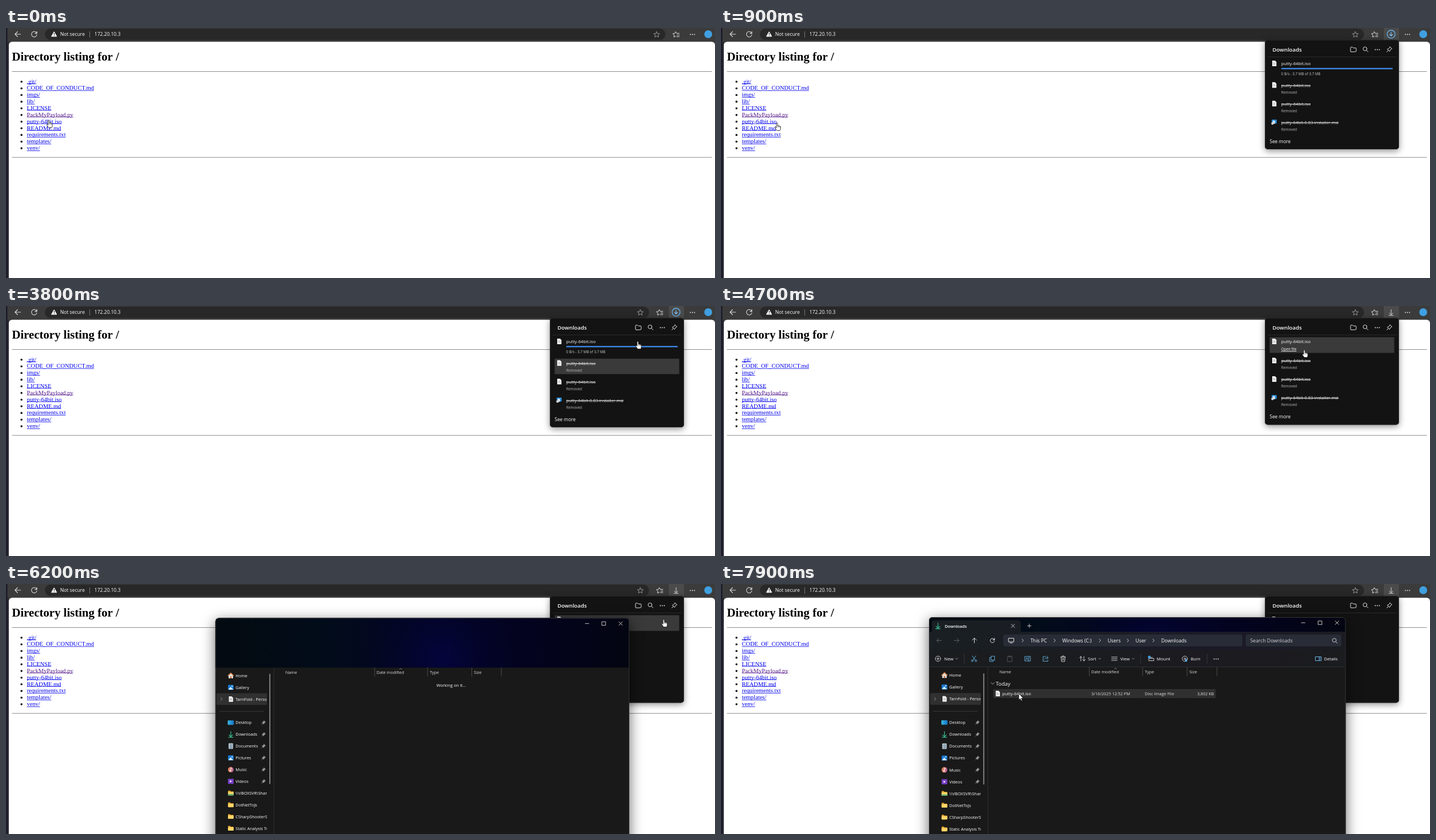
Recreate the animation shown at these times as an HTML page with a canvas. Size 1258 by 445 pixels, loop 8000 ms.

```html
<!DOCTYPE html>
<html lang="en">
<head>
<meta charset="utf-8">
<title>Directory listing</title>
<style>
html, body { margin: 0; width: 100%; height: 100%; overflow: hidden; background: #fff; }
canvas { display: block; }
</style>
</head>
<body>
<canvas id="stage" width="1258" height="445"></canvas>
<script>
const ctx = document.getElementById('stage').getContext('2d');
const LOOP = 8000, STEP = 100;
const DOWNLOAD_SHOWN = 700, DOWNLOAD_DONE = 4000, WINDOW_OPEN = 6000;
const UI = '"Open Sans", "Noto Sans", sans-serif';
const SERIF = '"Liberation Serif", serif';

// time, x, y of the pointer's hot spot
const POINTER = [
  [0, 76, 164], [700, 76, 164], [900, 99.5, 169], [1000, 330, 215], [1100, 700, 248],
  [1200, 1010, 253], [1300, 1106, 249], [1600, 1114, 244], [1700, 1114, 244],
  [2100, 1136, 239], [3300, 1136, 239], [3800, 1121, 63], [4400, 1121, 63],
  [4700, 1035, 78], [5200, 1184, 60], [5300, 1184, 59], [5500, 1160, 59],
  [5600, 1160, 59], [6000, 1167, 63], [6300, 1167, 63], [6700, 1072, 33],
  [6800, 1010, 60], [7000, 560, 154], [7100, 540, 192], [7200, 531, 203], [7300, 528, 195]
];

function pointerAt(t) {
  const next = POINTER.findIndex(k => k[0] > t);
  if (next < 0) return POINTER[POINTER.length - 1].slice(1);
  const a = POINTER[next - 1] || POINTER[0], b = POINTER[next];
  const p = (t - a[0]) / (b[0] - a[0] || 1);
  return [a[1] + (b[1] - a[1]) * p, a[2] + (b[2] - a[2]) * p];
}

function rect(x, y, w, h, color, r = 0) {
  ctx.fillStyle = color;
  ctx.beginPath();
  ctx.roundRect(x, y, w, h, r);
  ctx.fill();
}

function outline(x, y, w, h, color, r = 0) {
  ctx.strokeStyle = color;
  ctx.lineWidth = 1;
  ctx.beginPath();
  ctx.roundRect(x + .5, y + .5, w - 1, h - 1, r);
  ctx.stroke();
}

function disc(x, y, r, color) {
  rect(x - r, y - r, 2 * r, 2 * r, color, r);
}

// Text centred vertically on its capitals; returns its width.
function text(str, x, midY, size, color = '#fff', weight = 400, family = UI) {
  ctx.font = `${weight} ${size}px ${family}`;
  ctx.fillStyle = color;
  ctx.fillText(str, x, midY + size * .36);
  return ctx.measureText(str).width;
}

function icon(d, x, y, color = '#e6e6e6', width = 1, fill) {
  const p = new Path2D(d);
  ctx.save();
  ctx.translate(x, y);
  ctx.lineJoin = ctx.lineCap = 'round';
  if (fill) { ctx.fillStyle = fill; ctx.fill(p); }
  if (width) { ctx.strokeStyle = color; ctx.lineWidth = width; ctx.stroke(p); }
  ctx.restore();
}

function shadowed(color, blur, dy, draw) {
  ctx.save();
  ctx.shadowColor = color;
  ctx.shadowBlur = blur;
  ctx.shadowOffsetY = dy;
  draw();
  ctx.restore();
}

function gradient(x0, x1, ...colors) {
  const g = ctx.createLinearGradient(x0, 0, x1, 0);
  colors.forEach((c, i) => g.addColorStop(i / (colors.length - 1), c));
  return g;
}

const DOWN = 'M0-5V4M-3.2 1L0 4.2 3.2 1M-4 5.2H4';
const STAR = 'M0-5L1.5-1.6 5.2-1.3 2.4 1.1 3.3 4.7 0 2.8-3.3 4.7-2.4 1.1-5.2-1.3-1.5-1.6Z';
const FOLDER = 'M-5-3.5Q-5-4.5-4-4.5H-1.5L0-3H4Q5-3 5-2V3Q5 4-4 4Q-5 4-5 3Z';
const SEARCH = 'M2.6-.9A3.4 3.4 0 1 1-4.2-.9A3.4 3.4 0 1 1 2.6-.9M1.7 1.6L4.6 4.5';
const PIN = 'M1-4.5L4.5-1 2.8-.3 1 2 .3 3.7-3.7-.3-2-1 .3-2.8ZM-2 2L-4.7 4.7';
const CROSS = 'M-3-3L3 3M3-3L-3 3';
const PAGE = 'M-3.5-5H1.5L4-2.5V5H-3.5Z';

function dots(x, y) {
  for (const d of [-3.6, 0, 3.6]) disc(x + d, y, .9, '#eee');
}

function browser(t) {
  const shown = t >= DOWNLOAD_SHOWN, end = shown ? 1141 : 1170;
  rect(0, 0, 1258, 445, '#3b3b3b');
  rect(0, 25, 5, 420, '#2b2933');
  rect(0, 0, 2.5, 445, '#1d1b29');
  rect(5, 24.5, 1253, 440, '#fff', [6, 6, 0, 0]);
  rect(69, 1, end - 69, 20.5, '#282828', 10);
  icon('M5 0H-5M-.5-4.5L-5 0-.5 4.5', 21, 11, '#ddd', 1.1);
  icon('M4.6-1.5A4.8 4.8 0 1 0 4.8 1M4.8-4.8V-1.4H1.4', 50, 11, '#ddd', 1.1);
  icon('M0-4L4.5 4H-4.5Z', 85.5, 11, '#fff', 1, '#fff');
  rect(85, 9, 1.2, 3, '#282828');
  rect(85, 13, 1.2, 1.2, '#282828');
  text('Not secure', 96, 11.3, 8.7);
  rect(148, 6, 1, 11, '#777');
  text('172.20.10.3', 157, 11.3, 8.6);
  icon(STAR, end - 15.5, 11.5, '#a5a5a5', .9);
  const fav = shown ? 1160 : 1189;
  icon('M3-2L1-2-.8-5-2.4-1.8-6-1.3-3.4 1.2-4 4.7-1 3.2M2 1H5.5M1 3.8H5.5M3-2H5.5', fav, 11.5, '#e6e6e6', 1);
  dots(1218, 11.5);
  disc(1246, 11, 7, '#3f9fe0');
  if (shown) {
    rect(1176, 0, 27, 22, '#4b4b4b');
    if (t < DOWNLOAD_DONE) {
      ctx.strokeStyle = '#66b5f2';
      ctx.lineWidth = 1.3;
      ctx.beginPath();
      ctx.arc(1189, 11, 7, 0, 7);
      ctx.stroke();
      icon('M0-3.5V3M-2.6.5L0 3.2 2.6.5', 1189, 11, '#8cc8f7', 1.1);
    } else icon(DOWN, 1189, 11.5, '#ddd', 1);
  }
}

function listing(t) {
  text('Directory listing for /', 10.5, 50.3, 21.1, '#000', 700, SERIF);
  rect(10.5, 77, 1242, 1, '#8b8b8b');
  rect(10.5, 229.7, 1242, 1, '#8b8b8b');
  const names = ['.git/', 'CODE_OF_CONDUCT.md', 'imgs/', 'lib/', 'LICENSE', 'PackMyPayload.py',
    'putty-64bit.iso', 'README.md', 'requirements.txt', 'templates/', 'venv/'];
  names.forEach((name, i) => {
    const y = 95 + i * 11.85;
    const pressed = i === 6 && t >= 500 && t < 600;
    const color = pressed ? '#e00' : i === 5 ? '#551a8b' : '#0000ee';
    disc(27.5, y + .6, 1.8, '#000');
    const w = text(name, 37, y - .2, 10.55, color, 400, SERIF);
    rect(37, Math.round(y + 4), w, .8, color);
  });
}

function paper(x, y) {
  icon(PAGE, x, y, '#fff', 0, '#f2f2f2');
  rect(x - 2, y - 1, 4, .8, '#999');
  rect(x - 2, y + 1, 4, .8, '#999');
}

function downloads(t) {
  const done = t >= DOWNLOAD_DONE, shift = done ? -4.6 : 0;
  shadowed('rgba(0,0,0,.45)', 12, 3, () => rect(965, 21, 238, 195 + shift, '#131313', 5));
  outline(965, 21, 238, 195 + shift, '#292929', 5);
  text('Downloads', 978.5, 38.5, 9.7, '#fff', 600);
  icon(FOLDER, 1122, 38.5);
  icon(SEARCH, 1143.5, 38);
  dots(1164.5, 38.5);
  icon(PIN, 1186, 38);
  rect(970, 51, 228, 1, '#2b2b2b');

  const [px, py] = pointerAt(t - STEP);
  const rows = [102, 135, 168].map(y => y + shift);
  const over = (top, h) => {
    if (px > 974 && px < 1195 && py >= top && py <= top + h) rect(973.5, top, 221, h, '#3a3a3a');
  };
  over(55.5, done ? 28 : 33);
  paper(981.5, 63);
  text('putty-64bit.iso', 994, 63.7, 7.75);
  if (done) {
    const w = text('Open file', 994, 76.3, 6.4);
    rect(994, 80, w, .8, '#fff');
  } else {
    rect(994, 71, 198, 2.6, '#3a82dd', 1);
    text('0 B/s - 3.7 MB of 3.7 MB', 994, 81.4, 6.3, '#ccc');
  }
  rows.forEach((y, i) => {
    over(y - 8.3, 27.5);
    const msi = i === 2;
    if (msi) {
      rect(977, y - 5, 9, 7, '#2b8bd8', 1);
      rect(979, y - 3, 4, 5.5, '#d9e3ea');
      disc(978.5, y + 2, 2.2, '#cfd4d8');
    } else paper(981.5, y - .5);
    const w = text(msi ? 'putty-64bit-0.83-installer.msi' : 'putty-64bit.iso', 994, y, msi ? 7.6 : 7.75, '#eee');
    rect(994, y + .2, w, .8, '#eee');
    text('Removed', 994, y + 12.4, 6.4, '#bbb');
  });
  text('See more', 973.5, 201.8 + shift, 8.45);
}

function landscape(x, y) {
  rect(x - 5, y - 4.5, 10, 9, '#1878d1', 1.5);
  icon('M-4.5 4L-.5-1 4.5 4Z', x, y, '', 0, '#d7ecff');
  disc(x + 2.3, y - 2, 1, '#fff');
}

function yellowFolder(x, y) {
  icon(FOLDER, x, y, '', 0, '#dfa52d');
  rect(x - 5, y - 2, 10, 6, '#ffd566', 1);
}

const GLYPHS = {
  home(x, y) {
    icon('M-4 0V5H4V0L0-4Z', x, y, '', 0, '#e3ddd8');
    icon('M-4.8 0L0-4.5 4.8 0', x, y, '#e08545', 1.5);
    rect(x - 1, y + 1.5, 2.2, 3.5, '#bd6530');
  },
  landscape,
  paper,
  desktop(x, y) {
    rect(x - 5.5, y - 4, 11, 8, gradient(x - 5, x + 5, '#39b7e5', '#1573c4'), 1);
  },
  down(x, y) { icon(DOWN, x, y, '#38bf92', 1.2); },
  document(x, y) {
    rect(x - 4, y - 5, 8, 10, '#b4c5d2', 1);
    for (const d of [-2.5, 0, 2.5]) rect(x - 2, y + d, 4.5, 1, '#597184');
  },
  music(x, y) {
    disc(x, y, 5, gradient(x - 5, x + 5, '#e98a55', '#b8619c'));
    icon('M0 2V-3L2-2', x, y, '#fff', .9);
    disc(x - 1, y + 2, 1.2, '#fff');
  },
  video(x, y) {
    rect(x - 5, y - 4.5, 10, 9, '#7940c9', 1);
    icon('M-1.5-2L2 0-1.5 2Z', x, y, '', 0, '#fff');
  },
  share(x, y) {
    yellowFolder(x, y);
    rect(x - 5, y + 1.5, 10, 2.5, '#5eb578');
  },
  folder: yellowFolder
};

const PLACES = [
  ['home', 'Home'], ['landscape', 'Gallery'], ['paper', 'TarnFold - Personal'], null,
  ['desktop', 'Desktop', 1], ['down', 'Downloads', 1], ['document', 'Documents', 1],
  ['landscape', 'Pictures', 1], ['music', 'Music', 1], ['video', 'Videos', 1],
  ['share', '\\\\VBOXSVR\\Share'], ['folder', 'DotNetToJs'],
  ['folder', 'CSharpShooterS'], ['folder', 'Static Analysis Tools']
];

function sidebar() {
  ctx.save();
  ctx.beginPath();
  ctx.rect(369, 148, 92, 326);
  ctx.clip();
  PLACES.forEach((place, i) => {
    const y = 162.3 + i * 21.07;
    if (!place) return rect(376, 226, 79, 1, '#3a3a3a');
    if (i === 2) {
      rect(371, y - 10.5, 92, 21, '#303030', 2);
      icon('M-1.5-2.5L1.3 0-1.5 2.5', 380, y, '#999', .9);
    }
    GLYPHS[place[0]](396.5, y);
    text(place[1], 405, y, 7.45);
    if (place[2]) {
      ctx.save();
      ctx.translate(455, y);
      ctx.scale(.75, .75);
      icon(PIN, 0, 0, '#999', 1, '#999');
      ctx.restore();
    }
  });
  ctx.restore();
  rect(465.5, 159, 1.6, 198, '#989898', 1);
  rect(473, 148, 1, 326, '#2f2f2f');
}

function toolbar() {
  const chrome = gradient(369, 1108, '#191f23', '#1a1d24', '#1a1a27', '#1b1c22');
  rect(374, 64.5, 158, 22, chrome, [5, 5, 0, 0]);
  rect(369.5, 85, 738, 63, chrome);
  rect(369.5, 117, 738, 31, 'rgba(28,28,28,.55)');
  rect(369.5, 147, 738, 1, '#303135');
  icon(DOWN, 385, 74.5, '#38bf92', 1.2);
  text('Downloads', 397, 75, 7.3, '#fff', 600);
  icon(CROSS, 518, 74.5, '#ddd', .9);
  icon('M-3.2 0H3.2M0-3.2V3.2', 547, 74.5, '#ddd', .9);

  icon('M4.3 0H-4.3M-.5-3.8L-4.3 0-.5 3.8', 387, 100.5, '#5d6065');
  icon('M-4.3 0H4.3M.5-3.8L4.3 0 .5 3.8', 418, 100.5, '#5d6065');
  icon('M0 4.3V-4.3M-3.8-.5L0-4.3 3.8-.5', 449.5, 100.5);
  icon('M3.6-1.2A3.8 3.8 0 1 0 3.8 1M3.8-4V-1.1H1', 481.5, 100.5);
  rect(501, 90, 424, 21, '#282c36', 3);
  rect(931, 90, 169.5, 21, '#282c36', 3);
  icon('M-4.5-4H4.5V2.5H-4.5ZM-2 4.5H2', 515, 100.5);
  const crumbs = [['This PC', 549], ['Windows (C:)', 605.5], ['Users', 686], ['User', 735.5], ['Downloads', 781]];
  for (const [name, x] of crumbs) {
    icon('M-1.3-2.5L1.3 0-1.3 2.5', x - 13.5, 100.5, '#ddd', .9);
    text(name, x, 100.8, 8.7);
  }
  text('Search Downloads', 939, 100.8, 8.75, '#d2d3d6');
  icon(SEARCH, 1089, 101, '#ddd', .9);

  const y = 133;
  const chevron = x => icon('M-1.8-.8L0 1 1.8-.8', x, y, '#aaa', .8);
  icon('M4.7 0A4.7 4.7 0 1 1-4.7 0A4.7 4.7 0 1 1 4.7 0M-2.3 0H2.3M0-2.3V2.3', 385, y, '#ddd', .9);
  text('New', 396, y + .3, 8);
  chevron(418);
  rect(431, 124, 1, 18, '#33353a');
  icon('M-3-5L2 2.5M3-5L-2 2.5M-1.6 3.6A1.6 1.6 0 1 1-4.8 3.6A1.6 1.6 0 1 1-1.6 3.6M4.8 3.6A1.6 1.6 0 1 1 1.6 3.6A1.6 1.6 0 1 1 4.8 3.6', 449, y, '#69b7e8', .9);
  icon('M-1.5-4.5H4.5V2.5H-1.5ZM-1.5-2H-4.3V4.8H2V2.5', 481, y, '#69b7e8', .9);
  icon('M-4-4H4V5H-4ZM-1.5-5H1.5V-3H-1.5Z', 512.5, y, '#55585c', .9);
  icon('M1-4H-5V4H1M3-4H5V4H3M2-5V5M-3 2L-1.3-2.2.4 2', 544, y, '#69b7e8', .9);
  icon('M0-4H-4.5V4.5H4V2M-2 1Q-1-2 4-2M2-4.5L4.6-2 2 .5', 576, y, '#69b7e8', .9);
  icon('M-4.5-3H4.5M-3.5-3L-2.8 5H2.8L3.5-3M-1.5-3V-5H1.5V-3M-1-.8V2.5M1-.8V2.5', 607, y, '#ddd', .9);
  icon('M-2.5 4V-4M-5-1.5L-2.5-4 0-1.5M3-4V4M.5 1.5L3 4 5.5 1.5', 641, y, '#ddd', .9);
  text('Sort', 651, y + .3, 7.7);
  chevron(672);
  icon('M-5-3H5M-5 0H5M-5 3H5', 698, y, '#ddd', .9);
  text('View', 708.5, y + .3, 7.7);
  chevron(731.5);
  rect(744, 124, 1, 18, '#33353a');
  icon('M-4 0V3.5H5V0ZM-2.5-2.2H2.5', 763, y, '#ddd', .9);
  disc(760, 130, 2.5, '#3d9ee0');
  text('Mount', 773, y + .3, 7.8);
  icon('M4.7 0A4.7 4.7 0 1 1-4.7 0A4.7 4.7 0 1 1 4.7 0M1.5 0A1.5 1.5 0 1 1-1.5 0A1.5 1.5 0 1 1 1.5 0', 823, y, '#ddd', .9);
  icon('M0 4Q1 1 3 0 5 2 4 5H1Z', 823, y, '', 0, '#58aee5');
  text('Burn', 833.5, y + .3, 7.5);
  rect(862, 124, 1, 18, '#33353a');
  dots(878.5, y + .5);
  icon('M-5-3.5H5V3.5H-5ZM1.3-3.5V3.5M2.8-1.5H3.5M2.8 1H3.5', 1060, y, '#69b7e8', 1);
  text('Details', 1070, y + .3, 7.6);
}

function fileList(t, loaded) {
  const [px, py] = pointerAt(t);
  if (loaded && px > 474 && px < 653 && py > 148 && py < 165) rect(474, 148, 179, 17, '#383838');
  const columns = [['Name', 494, 653], ['Date modified', 657, 747.5], ['Type', 752, 826.5], ['Size', 831, 879.5]];
  for (const [name, x, edge] of columns) {
    text(name, x, 156.8, 7.4, '#ddd');
    rect(edge, 148, 1, 16, '#4c4c4c');
  }
  icon('M-2 .8L0-1 2 .8', 700, 150.5, '#999', .8);
  if (!loaded) return text('Working on it...', 764, 179.6, 7.5);

  icon('M-2.8-1.4L0 1.4 2.8-1.4', 482, 177, '#bbb', .9);
  text('Today', 487.5, 177.3, 9.4);
  const selected = t < 7900;
  rect(483, 187, 394.5, 16, selected ? '#4c4c4c' : '#303030');
  if (selected) outline(483, 187, 394.5, 16, '#bdbdbd');
  paper(491, 195);
  text('putty-64bit.iso', 499, 195.4, 7.6);
  text('3/16/2025 12:52 PM', 657, 195.4, 7.4, '#ddd');
  text('Disc Image File', 752, 195.4, 7.5, '#ddd');
  text('3,802 KB', 845, 195.4, 7.3, '#ddd');
}

function explorer(t) {
  if (t < WINDOW_OPEN) return;
  const fading = t < 6200;
  const scale = fading ? .84 : t < 6300 ? .993 : 1;
  const ready = t >= 6400, loaded = t >= 6500;
  ctx.save();
  ctx.globalAlpha = fading ? .03 : 1;
  ctx.translate(738.5, 266);
  ctx.scale(scale, scale);
  ctx.translate(-738.5, -266);
  shadowed('rgba(0,0,0,.6)', 24, 6, () => rect(369, 59, 739.5, 415, '#191919', 6));
  rect(369, 59, 739.5, 89, gradient(369, 1108, '#030a10', '#020c19', '#030424', '#03031f', '#030511'), [6, 6, 0, 0]);
  const glow = ctx.createRadialGradient(775, 130, 5, 775, 130, 150);
  glow.addColorStop(0, 'rgba(5,5,75,.6)');
  glow.addColorStop(1, 'rgba(3,3,40,0)');
  rect(600, 60, 350, 88, glow);
  if (ready) toolbar();
  outline(369, 59, 739.5, 415, '#34363a', 6);
  icon('M-3.2 0H3.2', 1033, 69, '#ddd', .9);
  icon('M-3.2-3.2H3.2V3.2H-3.2Z', 1063, 69, '#ddd', .9);
  icon('M-3.2-3.2L3.2 3.2M3.2-3.2L-3.2 3.2', 1093, 69, '#ddd', .9);
  sidebar();
  fileList(t, loaded);
  ctx.restore();
}

function pointer(t) {
  const [x, y] = pointerAt(t);
  const hand = t < 1000 || (t >= 3500 && t < 6500);
  if (hand) {
    icon('M-1.2 8V1Q-1.2 0 0 0T1.2 1V5Q2.4 4.4 3 5.3 4.2 4.8 4.7 5.8 6.2 5.4 6.2 7V10Q6.2 12 5 13.5H-.2Q-1 12-3.4 9 -4 7.6-2.8 7.3 -2 7.3-1.2 8Z', x, y, '#111', .8, '#fff');
    icon('M1.2 5V7.5M3 5.5V7.5M4.7 6V7.8', x, y, '#333', .6);
  } else {
    icon('M0 0V10.8L2.5 8.5 4.2 12.3 6 11.5 4.4 7.8H7.8Z', x + .4, y + .4, '#111', .7, '#fff');
  }
}

function frame(now) {
  const t = Math.floor(now % LOOP / STEP) * STEP;
  ctx.clearRect(0, 0, 1258, 445);
  browser(t);
  listing(t);
  if (t >= DOWNLOAD_SHOWN) downloads(t);
  explorer(t);
  pointer(t);
  requestAnimationFrame(now => frame(now - start));
}

const start = performance.now();
frame(0);
</script>
</body>
</html>
```
